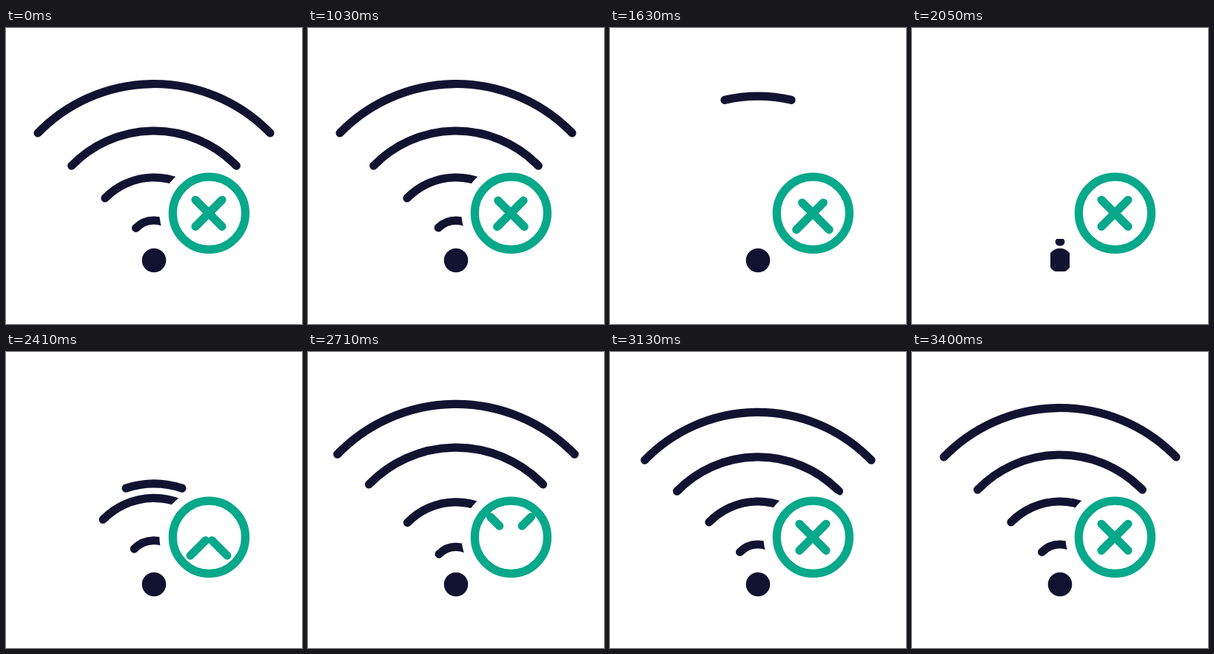
Recreate the animation shown at these times as an HTML page with a canvas. Size 400x400 px, loop 3.43 s.

```html
<!DOCTYPE html>
<html lang="en">
<head>
<meta charset="utf-8">
<title>No signal</title>
<style>
  html, body { margin: 0; width: 100%; height: 100%; overflow: hidden; background: #fff; }
  canvas { display: block; width: 400px; height: 400px; }
</style>
</head>
<body>
<canvas id="stage" width="400" height="400"></canvas>
<script>
const ctx = document.getElementById('stage').getContext('2d');
const LOOP = 3430;
const NAVY = '#121331', GREEN = '#08a88a';
const STROKE = 11.2;
const SWEEP = 45.9 * Math.PI / 180;
const DOT = { x: 200, y: 314, r: 16.3 };
const BADGE = { x: 274.4, y: 250.3, r: 49.1, gap: 67 };
const STAGGER = 150;

// Innermost first: radius and how far the spring overshoots
const ARCS = [
  { r: 34, over: 0.107 },
  { r: 92, over: 0.08 },
  { r: 155, over: 0.062 },
  { r: 218.5, over: 0.041 }
];

const clamp = v => Math.min(1, Math.max(0, v));
const ease = v => { v = clamp(v); return v * v * (3 - 2 * v); };

// Eased value of keys [time, value] at time t
function track(keys, t) {
  let i = keys.length - 1;
  while (i > 0 && keys[i][0] > t) i--;
  const [t0, v0] = keys[i];
  const [t1, v1] = keys[Math.min(i + 1, keys.length - 1)];
  return t1 > t0 ? v0 + (v1 - v0) * ease((t - t0) / (t1 - t0)) : v0;
}

const SPRING = [[2150, 0], [2365, 1], [2680, -0.6], [2960, 0]];
const OPEN = [[1005, 1], [1275, 0], [2018, 0], [2233, 1]];

// Both ends of a cross bar, as offsets along its diagonal
const TAIL = [[0, -18], [400, 34], [400, -34], [610, -14], [750, -19], [900, -18]];
const HEAD = [[0, 18], [400, 34], [400, -34], [610, 22.5], [750, 17], [900, 18]];

function arcState({ r, over }, i, t) {
  const local = t - i * STAGGER;
  const open = track(OPEN, local);
  const scale = local < 1700
    ? 1 - 0.125 * (Math.max(0, local - 1005) / 235) ** 2
    : ease((local - 1920) / 275) + over * track(SPRING, local);
  return { r: r * scale, cy: DOT.y - 20 * scale, angle: SWEEP * open };
}

function disc(x, y, r, color) {
  ctx.fillStyle = color;
  ctx.beginPath();
  ctx.arc(x, y, r, 0, Math.PI * 2);
  ctx.fill();
}

function drawSignal(t) {
  const arcs = ARCS.map((a, i) => arcState(a, i, t)).filter(a => a.angle > 0.001);
  const half = Math.max(0, ...arcs.map(a => a.r * Math.sin(a.angle)));
  ctx.save();
  // The group is cropped tightly while the arcs are folded away
  if (half < 11) {
    const top = Math.min(299, ...arcs.map(a => a.cy - a.r - 4));
    ctx.beginPath();
    ctx.rect(DOT.x - 13, top, 26, 329 - top);
    ctx.clip();
  }
  ctx.strokeStyle = NAVY;
  for (const { r, cy, angle } of arcs) {
    ctx.beginPath();
    ctx.arc(DOT.x, cy, r, -Math.PI / 2 - angle, -Math.PI / 2 + angle);
    ctx.stroke();
  }
  disc(DOT.x, DOT.y, DOT.r, NAVY);
  ctx.restore();
}

function drawBadge(t) {
  const { x, y, r, gap } = BADGE;
  disc(x, y, gap, '#fff');
  ctx.strokeStyle = GREEN;
  ctx.beginPath();
  ctx.arc(x, y, r, 0, Math.PI * 2);
  ctx.stroke();

  const local = t - (t < 2230 ? 1000 : 2230);
  const a = track(TAIL, Math.max(0, local));
  const b = track(HEAD, Math.max(0, local));
  ctx.beginPath();
  for (const side of [-1, 1]) {
    ctx.moveTo(x - 0.4 + side * a, y + a);
    ctx.lineTo(x - 0.4 + side * b, y + b);
  }
  ctx.stroke();
}

function draw(t) {
  ctx.fillStyle = '#fff';
  ctx.fillRect(0, 0, 400, 400);
  ctx.lineWidth = STROKE;
  ctx.lineCap = 'round';
  drawSignal(t);
  drawBadge(t);
}

const start = performance.now();
function tick() {
  draw((performance.now() - start) % LOOP);
  requestAnimationFrame(tick);
}
tick();
</script>
</body>
</html>
```
